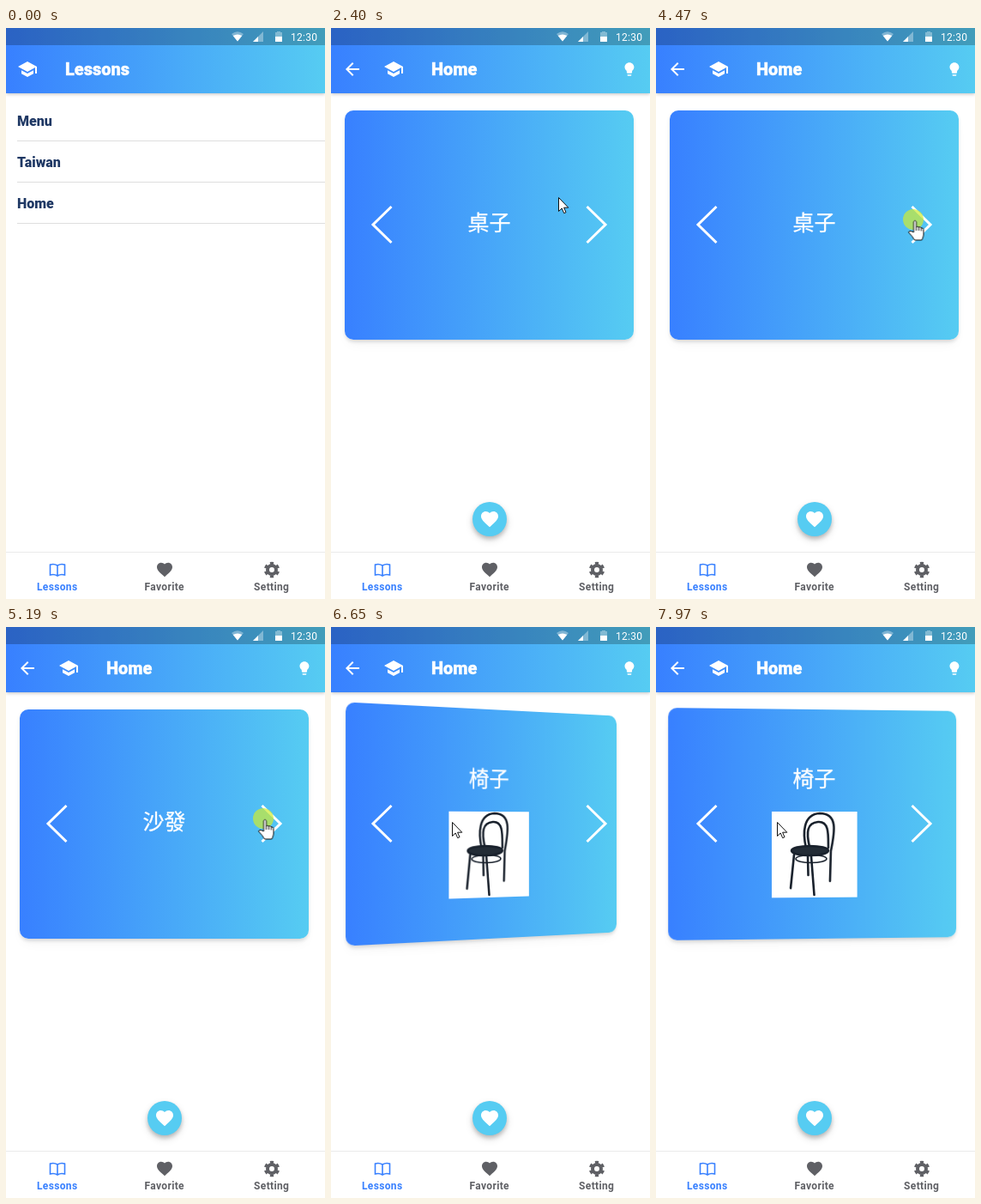
An HTML page that plays this animation: 372 by 665 pixels, repeating every 8 s.

```html
<!DOCTYPE html>
<html lang="en">
<head>
<meta charset="utf-8">
<title>Vocabulary cards</title>
<style>
  html, body { margin: 0; width: 100%; height: 100%; overflow: hidden; background: #fff; }
  #stage { position: relative; width: 372px; height: 665px; overflow: hidden; font-family: Roboto, sans-serif; font-weight: 700; }
  #stage svg { position: absolute; left: 0; top: 0; overflow: visible; }
  .page { position: absolute; isolation: isolate; left: 0; top: 0; width: 372px; height: 610px; background: #fff; }
  header, .face { background: linear-gradient(90deg, #3880ff, #56ccf2); color: #fff; }
  header { position: absolute; z-index: 1; width: 100%; height: 76px; box-shadow: 0 1px 4px rgba(0,0,0,.25); }
  h1 { position: absolute; top: 20px; margin: 0; font: 900 20px/56px Roboto, sans-serif; }
  h1, .face p { -webkit-text-stroke: .35px; }
  .row { margin-left: 13px; height: 47px; border-bottom: 1px solid #dedede; font-size: 16px; font-weight: 900; line-height: 49px; color: #1f3864; }
  #swiper { position: absolute; top: 76px; width: 100%; height: 307px; overflow: hidden; }
  #strip { position: absolute; left: 0; top: 0; }
  .slide { position: absolute; left: 16px; top: 20px; width: 337px; height: 267px; perspective: 1000px; }
  .flip, .face { position: absolute; width: 100%; height: 100%; }
  .flip { transform-style: preserve-3d; }
  .face { border-radius: 10px; box-shadow: 0 3px 5px -1px rgba(0,0,0,.16), 0 8px 14px -4px rgba(0,0,0,.05); backface-visibility: hidden; text-align: center; }
  .back { transform: rotateY(180deg); }
  .face p { position: absolute; width: 100%; margin: 0; line-height: 40px; }
  .word { top: 108.5px; font-family: "Noto Sans CJK TC", "Noto Sans CJK SC", "Noto Sans CJK JP", "Noto Sans CJK", sans-serif; font-size: 25px; font-weight: 500; }
  .pictured .word { top: 58.5px; }
  .back p { top: 96px; font-size: 20px; font-weight: 900; }
  .back p + p { top: 136px; }
  .thin { font-weight: 400; }
  #stage .chair { left: 119px; top: 119px; background: #fff; overflow: hidden; }
  #fab { position: absolute; left: 165px; top: 552px; width: 40px; height: 40px; border-radius: 50%; background: #56ccf2; box-shadow: 0 3px 5px rgba(0,0,0,.2), 0 4px 10px rgba(0,0,0,.14); }
  .tab { font-size: 12px; letter-spacing: .36px; text-anchor: middle; }
</style>
</head>
<body>
<div id="stage">
  <section class="page">
    <header>
      <h1 style="left:69px">Lessons</h1>
      <svg width="372" height="76" fill="#fff"><use href="#cap" x="13" y="36"/></svg>
    </header>
    <div style="padding-top:84px">
      <div class="row">Menu</div>
      <div class="row">Taiwan</div>
      <div class="row">Home</div>
    </div>
  </section>

  <section class="page" id="home">
    <header>
      <h1 style="left:117px">Home</h1>
      <svg width="372" height="76" fill="#fff">
        <path transform="translate(13 36)" d="M20 11H7.83l5.59-5.59L12 4l-8 8 8 8 1.41-1.41L7.83 13H20z"/>
        <use href="#cap" x="61" y="36"/>
        <path transform="translate(338.6 38.6) scale(.78)" d="M9 21c0 .55.45 1 1 1h4c.55 0 1-.45 1-1v-1H9zM12 2C8.14 2 5 5.14 5 9c0 2.38 1.19 4.47 3 5.74V17c0 .55.45 1 1 1h6c.55 0 1-.45 1-1v-2.26c1.81-1.27 3-3.36 3-5.74 0-3.86-3.14-7-7-7z"/>
      </svg>
    </header>
    <div id="swiper">
      <div id="strip">
        <div class="slide">
          <div class="flip" id="table">
            <div class="face"><p class="word">桌子</p></div>
            <div class="face back"><p>Tisch</p><p>zhuō zi</p></div>
          </div>
        </div>
        <div class="slide" style="left:391px">
          <div class="face"><p class="word">沙發</p></div>
        </div>
        <div class="slide" style="left:766px">
          <div class="flip" id="chair">
            <div class="face pictured">
              <p class="word">椅子</p>
              <svg class="chair" width="100" height="100" fill="none" stroke="#18202b" stroke-width="2.6" stroke-linecap="round">
                <path d="M40 42C36 26 36 3 56 2C77 2 74 22 69 46L68 81M44 41C40 24 41 13 54 12C67 11 66 26 66 42M26 50L22 89M46 52L49.500 97M42 52L42.500 74"/>
                <ellipse cx="46" cy="55" rx="18" ry="4.500" stroke-width="1.600"/>
                <ellipse cx="44.500" cy="45.500" rx="21.500" ry="5.500" fill="#232c36"/>
              </svg>
            </div>
            <div class="face back"><p>Stuhl</p><p>y<span class="thin">ǐ</span>zi</p></div>
          </div>
        </div>
      </div>
    </div>
    <svg width="372" height="610" fill="none" stroke="#fff" stroke-width="3">
      <path d="M70.500 208L49 229L70.500 250M298.500 208L320 229L298.500 250"/>
    </svg>
    <div id="fab"><svg width="40" height="40" fill="#fff"><use href="#heart" x="8" y="8"/></svg></div>
  </section>

  <svg width="372" height="665">
    <defs>
      <path id="cap" d="M5 13.18v4L12 21l7-3.820v-4L12 17zM12 3L1 9l11 6 9-4.910V17h2V9z"/>
      <path id="heart" d="M12 21.350l-1.450-1.320C5.400 15.360 2 12.280 2 8.500 2 5.420 4.420 3 7.500 3c1.740 0 3.410.81 4.500 2.090C13.090 3.810 14.760 3 16.500 3 19.580 3 22 5.420 22 8.500c0 3.780-3.400 6.860-8.550 11.540z"/>
    </defs>
    <!-- status bar -->
    <path d="M0 0H372V20H0Z" opacity=".23"/>
    <g fill="#fff">
      <path d="M263 7Q270 1.500 277 7L270 15.500ZM288 16L300 4V16ZM314 5H316V4H320V5H322V16H314Z" opacity=".35"/>
      <path d="M264.700 9Q270 6 275.300 9L270 15.500ZM288 16L294 10V16ZM314 10H322V16H314Z"/>
      <text x="332" y="14.500" font-size="12" font-weight="400" letter-spacing=".3">12:30</text>
    </g>
    <!-- tab bar -->
    <path d="M0 610H372V665H0Z" fill="#fff"/>
    <path d="M0 610.500H372" stroke="#ebebeb"/>
    <g class="tab" fill="#3880ff">
      <path d="M51.500 625Q56 623.500 60 626Q64 623.500 68.500 625V637Q64 635.500 60 638Q56 635.500 51.500 637ZM60 626V638" fill="none" stroke="#3880ff" stroke-width="1.600"/>
      <text x="59.700" y="655">Lessons</text>
    </g>
    <g class="tab" fill="#5f6065">
      <use href="#heart" transform="translate(174.200 620) scale(.9)"/>
      <text x="184.700" y="655">Favorite</text>
      <g transform="translate(310 631)" fill="none" stroke="#5f6065">
        <circle r="5" stroke-width="4"/>
        <circle r="7.700" stroke-width="3" pathLength="12" stroke-dasharray="1 1" stroke-dashoffset="-.5"/>
      </g>
      <text x="309.700" y="655">Setting</text>
    </g>
  </svg>

  <svg id="cursor" width="1" height="1" stroke="#111" stroke-linejoin="round" fill="#fff">
    <circle id="press" r="12" fill="#cdeb32" fill-opacity=".7" stroke="none"/>
    <path id="arrow" d="M.5 .5V16.500L4.200 13L6.700 18.700L9 17.700L6.600 12.200H11.800Z"/>
    <path id="hand" transform="translate(.5 1)" d="M0 1.500Q1.500-1 3 1.500V8Q4.500 6.500 6 8Q7.500 7 9 9Q10.500 8 11.500 10.500V17Q11 20 9.500 23H1Q-1 19-6 14Q-5 11 0 14ZM3 8V12M6 8V12M9 9V12.500"/>
  </svg>
</div>
<script>
const LOOP = 8000, SPAN = 8200; // the last flip is cut off by the loop
const tracks = [];

// keys: [time in ms, value, easing to the next key]
function track(id, prop, keys) {
  const all = [[0, keys[0][1]], ...keys, [SPAN, keys.at(-1)[1]]];
  const frames = all.map(([t, v, easing = 'linear']) => ({ offset: t / SPAN, [prop]: v, easing }));
  const anim = document.getElementById(id).animate(frames, { duration: SPAN, fill: 'both' });
  anim.pause();
  tracks.push(anim);
}

// visible only inside the given [from, to] spans
const show = (id, spans) => track(id, 'opacity', [[0, 0, 'step-end'],
  ...spans.flatMap(([from, to]) => [[from, 1, 'step-end'], [to, 0, 'step-end']])]);

const move = (id, keys) => track(id, 'transform',
  keys.map(([t, x, y, easing]) => [t, `translate(${x}px, ${y}px)`, easing]));

// each flip: start time, start angle, end angle
const flips = (id, list) => track(id, 'transform', list.flatMap(([t, a, b]) =>
  [[t, `rotateY(${a}deg)`, 'ease'], [t + 600, `rotateY(${b}deg)`]]));

const pageEase = 'cubic-bezier(.36,.66,.04,1)';
track('home', 'opacity', [[2060, 0, pageEase], [2340, 1]]);
move('home', [[2060, 0, 40, pageEase], [2340, 0, 0]]);

flips('table', [[2790, 0, 180], [3600, 180, 0]]);
flips('chair', [[6583, 0, 180], [7496, 180, 0]]);
move('strip', [[4550, 0, 0, 'ease'], [4850, -375, 0], [5255, -375, 0, 'ease'], [5555, -750, 0]]);

move('cursor', [
  [670, 368, 646], [760, 289, 579], [1620, 289, 579, 'ease-in-out'], [1820, 265, 197],
  [2625, 265, 197], [2710, 213, 206], [3950, 213, 206, 'ease-in-out'], [4235, 300, 223],
  [6265, 300, 223, 'ease-in-out'], [6500, 141, 227]
]);
show('arrow', [[678, 1780], [2300, 4170], [6330, SPAN]]);
show('hand', [[1780, 2300], [4170, 6330]]);
show('press', [[1870, 1950], [2710, 2790], [3545, 3630], [4465, 4550], [5185, 5265], [6500, 6590], [7415, 7500]]);

function draw(now) {
  for (const anim of tracks) anim.currentTime = now % LOOP;
  requestAnimationFrame(draw);
}
draw(0);
</script>
</body>
</html>
```
